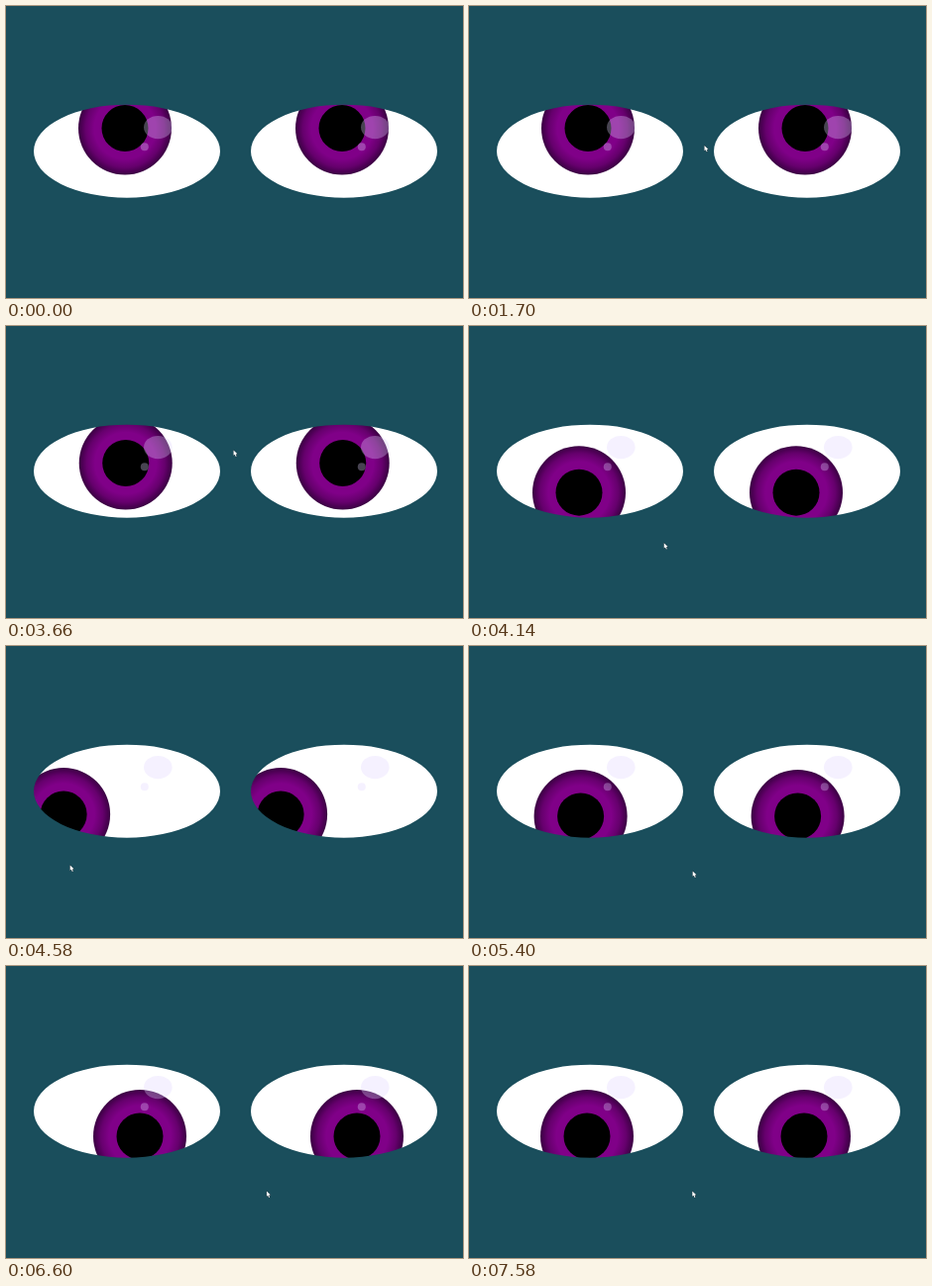
These frames come from a looping animation (461x295 px, 7.6 s). An HTML page with a canvas:

```html
<!DOCTYPE html>
<html lang="en">
<head>
<meta charset="utf-8">
<title>Watching eyes</title>
<style>
html, body { margin: 0; width: 100%; height: 100%; overflow: hidden; background: #1a4e5c; }
canvas { display: block; }
</style>
</head>
<body>
<canvas id="stage" width="461" height="295"></canvas>
<script>
const ctx = document.getElementById('stage').getContext('2d');
const W = 461, H = 295;
const LOOP = 7600;
const LAG = 36;
const WAKE = 1715;
const SKIN = '#1a4e5c';
const GLINT = 'rgba(225,212,255,0.32)';
const EYE = { x: 122, y: 146.7, rx: 94, ry: 47, gap: 219 };
const REST = { x: 120, y: 123.5 };

// Turning points of the pointer on each axis: time, position
const turnsX = [
  [0, 480], [540, 80], [1240, 320], [1700, 237.5], [3900, 229.3],
  [4780, 42], [5975, 388], [6500, 267], [7000, 225.3]
];
const turnsY = [
  [0, 215], [330, 104], [680, 255], [1250, 244], [1850, 123.5], [2300, 164],
  [3100, 53], [3600, 123], [4200, 221.5], [4580, 221.5], [5400, 227.5],
  [5950, 236], [6550, 227.5]
];

const mix = (a, b, k) => a + (b - a) * k;
const swing = k => (1 - Math.cos(Math.PI * Math.min(1, Math.max(0, k)))) / 2;

function follow(turns, t) {
  const i = turns.findIndex(turn => turn[0] > t);
  if (i < 0) return turns[turns.length - 1][1];
  const [t0, a] = turns[i - 1], [t1, b] = turns[i];
  return mix(a, b, swing((t - t0) / (t1 - t0)));
}

const pointerAt = t => ({ x: follow(turnsX, t), y: follow(turnsY, t) });

// The eyes rest until they wake, then trail the pointer
function gazeAt(t) {
  if (t <= WAKE) return REST;
  const p = pointerAt(t - LAG);
  const k = swing((t - WAKE) / 100);
  return {
    x: mix(REST.x, 119 + 0.4 * (p.x - 225.3), k),
    y: mix(REST.y, 172 + 0.322 * (p.y - 227.5), k)
  };
}

function oval(x, y, rx, ry, fill) {
  ctx.beginPath();
  ctx.ellipse(x, y, rx, ry, 0, 0, Math.PI * 2);
  ctx.fillStyle = fill;
  ctx.fill();
}

function drawIris({ x, y }) {
  const shade = ctx.createRadialGradient(x, y, 0, x, y, 47);
  shade.addColorStop(0.66, '#800088');
  shade.addColorStop(0.84, '#66006d');
  shade.addColorStop(1, '#3a0042');
  oval(x, y, 47, 47, shade);
  oval(x, y, 23.5, 23.5, '#000');
}

function drawEye(dx, gaze) {
  ctx.save();
  ctx.translate(dx, 0);
  ctx.beginPath();
  ctx.rect(EYE.x - EYE.gap / 2, 0, EYE.gap, H);
  ctx.clip();
  drawIris(gaze);
  oval(153.3, 122.6, 14.3, 11.7, GLINT);
  oval(139.8, 142.3, 4, 4, GLINT);
  ctx.restore();
}

// Everything outside the two eye openings
function drawSkin() {
  ctx.beginPath();
  ctx.rect(0, 0, W, H);
  for (const x of [EYE.x, EYE.x + EYE.gap]) {
    ctx.moveTo(x + EYE.rx, EYE.y);
    ctx.ellipse(x, EYE.y, EYE.rx, EYE.ry, 0, 0, Math.PI * 2);
  }
  ctx.fillStyle = SKIN;
  ctx.fill('evenodd');
}

function drawPointer({ x, y }) {
  ctx.save();
  ctx.translate(x, y);
  ctx.scale(0.88, 0.88);
  ctx.beginPath();
  [[0, 0], [0, 6], [1.4, 4.9], [2.5, 7.3], [3.5, 6.8], [2.5, 4.5], [4.4, 4.3]]
    .forEach(point => ctx.lineTo(...point));
  ctx.closePath();
  ctx.lineWidth = 0.6;
  ctx.strokeStyle = '#1c2226';
  ctx.stroke();
  ctx.fillStyle = '#fff';
  ctx.fill();
  ctx.restore();
}

function draw() {
  const t = performance.now() % LOOP;
  ctx.fillStyle = '#fff';
  ctx.fillRect(0, 0, W, H);
  const gaze = gazeAt(t);
  drawEye(0, gaze);
  drawEye(EYE.gap, gaze);
  drawSkin();
  drawPointer(pointerAt(t));
  requestAnimationFrame(draw);
}
draw();
</script>
</body>
</html>
```
